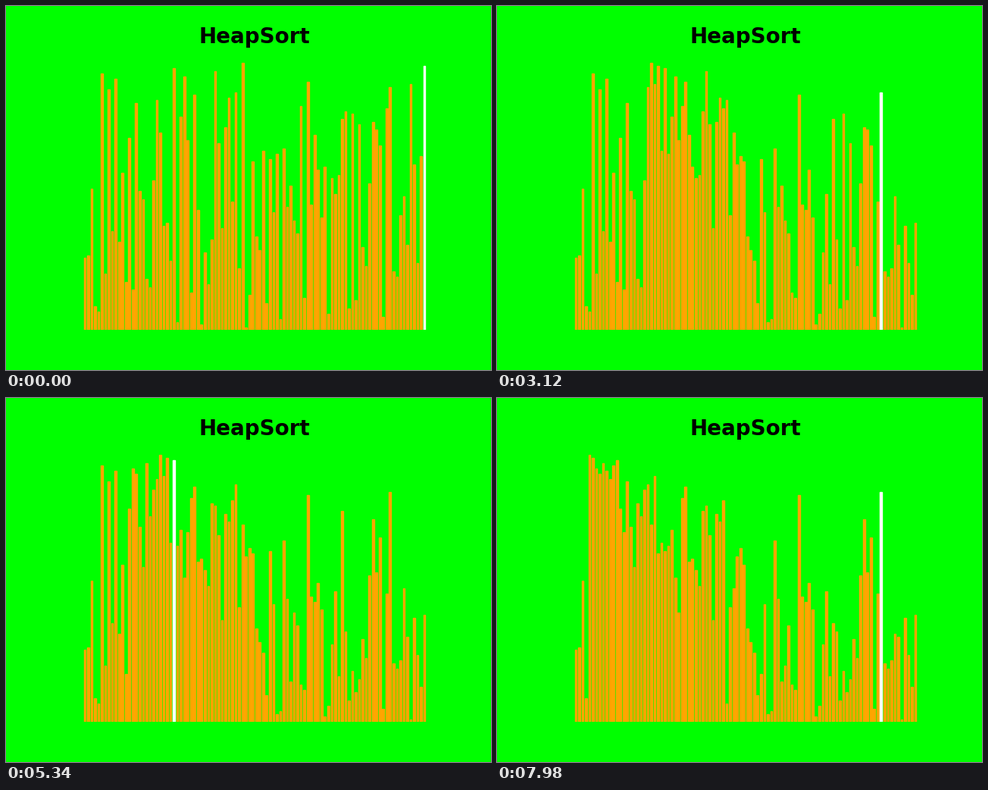
Recreate the animation shown at these times as a matplotlib script. Size 640 by 480 pixels, loop 8000 ms.

```python
import matplotlib.pyplot as plt
from matplotlib.animation import FuncAnimation

TICK = 20            # ms per animation tick
TICKS_PER_STEP = 3   # every sorting step stays for 60 ms
LOOP = 8000

START = [
    27, 28, 53, 9, 7, 96, 21, 90, 37, 94, 33, 59, 18, 72, 15, 85, 52, 49, 19, 16,
    56, 86, 74, 39, 40, 26, 98, 3, 80, 95, 71, 14, 88, 45, 2, 29, 17, 34, 97, 70,
    38, 76, 87, 48, 89, 23, 100, 1, 13, 63, 35, 30, 67, 10, 64, 44, 66, 4, 68, 46,
    54, 41, 36, 84, 12, 93, 47, 73, 60, 42, 61, 6, 57, 51, 58, 79, 82, 8, 81, 11,
    77, 31, 24, 55, 78, 75, 69, 5, 83, 91, 22, 20, 43, 50, 32, 92, 62, 25, 65, 99,
]


def sift_down(data, i):
    """Yield (heights, marked bar) for each node that has to move."""
    trail = [i]
    for child in (2 * i + 1, 2 * i + 2):
        if child < len(data) and data[child] > data[trail[-1]]:
            trail.append(child)
    if len(trail) == 1:
        return
    for mark in trail:
        yield data[:], mark
    top = trail[-1]
    data[i], data[top] = data[top], data[i]
    yield from sift_down(data, top)


def build_heap(data):
    for i in range(len(data) // 2 - 1, -1, -1):
        yield from sift_down(data, i)


# The loop opens with the first child already marked.
steps = list(build_heap(START[:]))[1:]

fig, ax = plt.subplots(figsize=(6.4, 4.8), dpi=100, facecolor="lime")
bars = ax.bar(range(len(START)), START, width=0.6, color="orange", linewidth=1)
ax.set_title("HeapSort", fontsize=20, fontweight="bold", color="black")
ax.set_xlim(ax.get_xlim())
ax.set_ylim(0, 1.05 * max(START))
ax.axis("off")


def update(tick):
    heights, mark = steps[tick // TICKS_PER_STEP]
    for i, (bar, height) in enumerate(zip(bars, heights)):
        bar.set_height(height)
        bar.set_color("white" if i == mark else "orange")
    return bars


anim = FuncAnimation(fig, update, frames=LOOP // TICK, interval=TICK,
                     init_func=lambda: update(0), repeat=True, repeat_delay=0)
plt.show()
```
